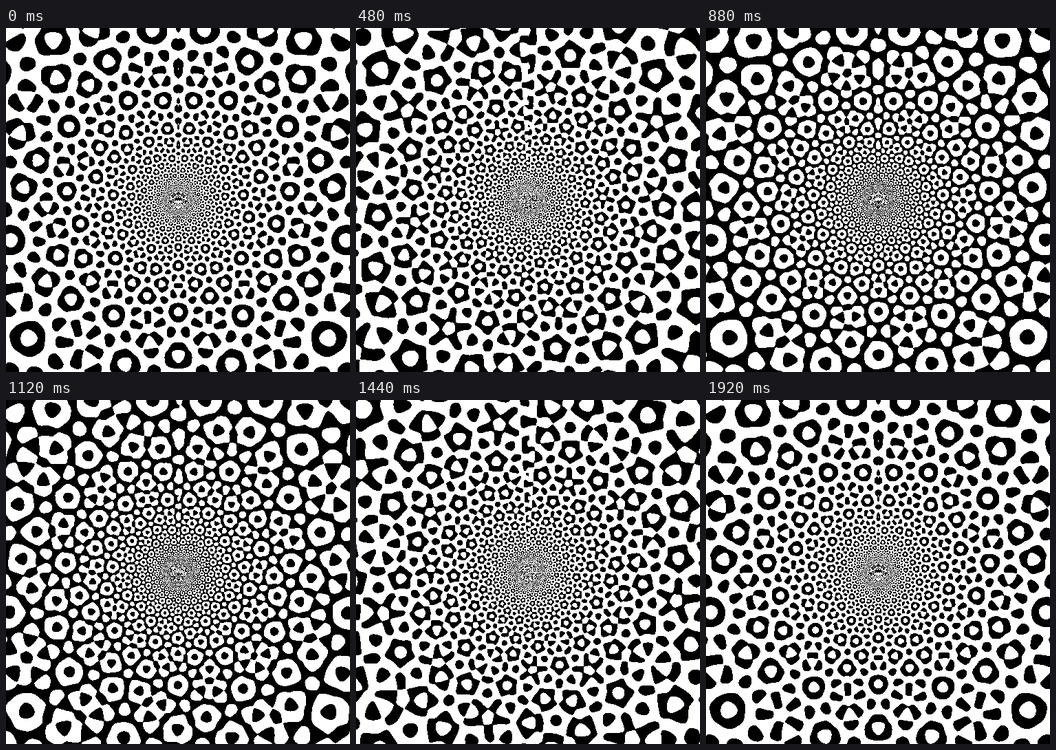
Animation of 500x500 px, one loop 2000 ms. Source, as an HTML page with a canvas:

```html
<!DOCTYPE html>
<html lang="en">
<head>
<meta charset="utf-8">
<title>Log-polar quasicrystal</title>
<style>
  html, body { margin: 0; width: 100%; height: 100%; overflow: hidden; background: #fff; }
  canvas { display: block; width: 100vw; height: 100vh; image-rendering: pixelated; }
</style>
</head>
<body>
<canvas id="stage" width="500" height="500"></canvas>
<script>
const SIZE = 500;
const WAVES = 5;
const STRIPES = 61;
const THRESHOLD = -0.25;
const STEP_MS = 80;
const STEPS = 25; // the last step repeats the first pose

const ctx = document.getElementById('stage').getContext('2d');
const image = ctx.createImageData(SIZE, SIZE);
const pixels = new Uint32Array(image.data.buffer);
const BLACK = 0xff000000, WHITE = 0xffffffff;

// Plane waves in (angle, log radius) space, split into cosine and sine parts.
const cosSum = new Float32Array(SIZE * SIZE);
const sinSum = new Float32Array(SIZE * SIZE);
const directions = Array.from({ length: WAVES }, (_, j) => {
  const angle = j * Math.PI / WAVES;
  return [STRIPES * Math.cos(angle), STRIPES * Math.sin(angle)];
});

for (let y = 0, p = 0; y < SIZE; y++) {
  for (let x = 0; x < SIZE; x++, p++) {
    const dx = x - SIZE / 2, dy = y - SIZE / 2;
    const theta = Math.atan2(dx, dy);
    const rho = Math.log(Math.hypot(dx, dy) || 1);
    for (const [kTheta, kRho] of directions) {
      const arg = kTheta * theta - kRho * rho;
      cosSum[p] += Math.cos(arg);
      sinSum[p] += Math.sin(arg);
    }
  }
}

function draw(step) {
  const phase = 2 * Math.PI * step / (STEPS - 1);
  const c = Math.cos(phase), s = Math.sin(phase);
  for (let p = 0; p < pixels.length; p++) {
    pixels[p] = cosSum[p] * c - sinSum[p] * s > THRESHOLD ? WHITE : BLACK;
  }
  ctx.putImageData(image, 0, 0);
}

let shown = 0;
draw(shown);
const start = performance.now();

function tick() {
  const step = Math.floor((performance.now() - start) / STEP_MS) % STEPS;
  if (step !== shown) draw(shown = step);
  requestAnimationFrame(tick);
}
requestAnimationFrame(tick);
</script>
</body>
</html>
```
